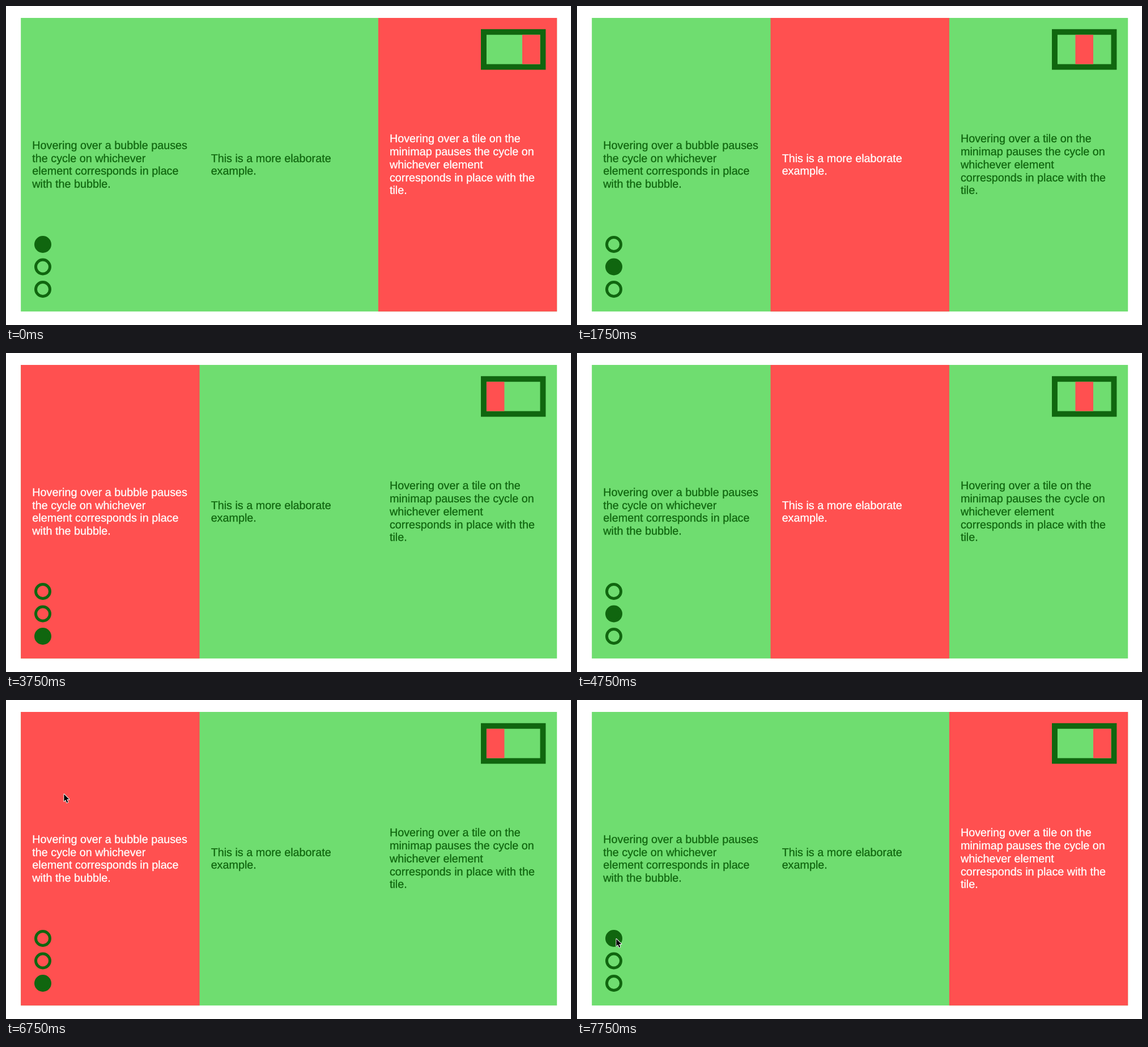
Animation of 997 by 562 pixels, one loop 8000 ms. Source, as an HTML page:

```html
<!DOCTYPE html>
<html lang="en">
<head>
<meta charset="utf-8">
<title>Cycling tiles</title>
<style>
  html, body { margin: 0; width: 100%; height: 100%; overflow: hidden; background: #fff; }
  svg { display: block; width: 997px; height: 562px; }
  text {
    font: 19.78px Helvetica, "Liberation Sans", Arial, sans-serif;
    text-rendering: geometricPrecision;
    stroke-width: .3;
  }
  circle { stroke: #10660f; stroke-width: 5; }
  #cursor { fill: #000; stroke: #fff; stroke-width: 1.8; stroke-linejoin: round; paint-order: stroke; }
</style>
</head>
<body>
<svg viewBox="0 0 997 562">
  <g id="tiles"></g>
  <g id="map"></g>
  <g id="bubbles"></g>
  <path id="cursor" d="M1.4 2V14.4L4.2 11.8L6.3 16.9L8.4 16L6.3 11H10.4Z"/>
</svg>
<script>
const GREEN = '#6fdd70', DARK = '#10660f', RED = '#ff5050', PALE = '#fff';
const LOOP = 8000, TICK = 1000, LINE = 22.75, PAD = 19.8, BORDER = 9.9;

const panel = { x: 26.2, y: 21, w: 946, h: 517.2 };
const map = { w: panel.w / 10, h: panel.h / 10 };
map.x = panel.x + panel.w - PAD - BORDER - map.w;
map.y = panel.y + PAD + BORDER;

const copy = [
  ['Hovering over a bubble pauses', 'the cycle on whichever', 'element corresponds in place', 'with the bubble.'],
  ['This is a more elaborate', 'example.'],
  ['Hovering over a tile on the', 'minimap pauses the cycle on', 'whichever element', 'corresponds in place with the', 'tile.']
];

// pointer stops: [time in ms, x, y]; it starts out above the stage
const stops = [
  [0, 100, -40], [2000, 100, -13], [2250, 100, -40], [5000, 3, 127], [5250, 60, 127],
  [5500, 68, 126], [6000, 67, 150], [6750, 101, 164], [7000, 201, 202], [7250, 108, 381], [7750, 68, 419]
];

const $ = id => document.getElementById(id);

function add(parent, tag, attrs) {
  const el = document.createElementNS('http://www.w3.org/2000/svg', tag);
  for (const key in attrs) el.setAttribute(key, attrs[key]);
  return parent.appendChild(el);
}

// a green base hides the seams between cells
function addCells(parent, { x, y, w, h }) {
  add(parent, 'rect', { x, y, width: w, height: h, fill: GREEN });
  return copy.map((_, i) =>
    add(parent, 'rect', { x: x + i * w / 3, y, width: w / 3, height: h }));
}

function addLabel(lines, i) {
  const x = panel.x + PAD + .3 + i * panel.w / 3;
  const top = panel.y + (panel.h - lines.length * LINE) / 2;
  const label = add($('tiles'), 'text', {});
  lines.forEach((line, n) => {
    add(label, 'tspan', { x, y: top + 17.7 + n * LINE }).textContent = line;
  });
  return label;
}

const tiles = addCells($('tiles'), panel);
const labels = copy.map(addLabel);
add($('map'), 'rect', {
  x: map.x - BORDER, y: map.y - BORDER,
  width: map.w + 2 * BORDER, height: map.h + 2 * BORDER, fill: DARK
});
const mapCells = addCells($('map'), map);

// bubbles run in the opposite order to the tiles
const bubbleY = i => 420 + (2 - i) * 39.5;
const bubbles = copy.map((_, i) =>
  add($('bubbles'), 'circle', { cx: 65, cy: bubbleY(i), r: 12.5 }));

// tile under the pointer or matching the bubble under it, -1 if none
function hovered(x, y) {
  const bubble = bubbles.findIndex((_, i) => Math.hypot(x - 65, y - bubbleY(i)) < 15);
  if (bubble >= 0) return bubble;
  const inside = x >= panel.x && x < panel.x + panel.w && y >= panel.y && y < panel.y + panel.h;
  return inside ? Math.floor((x - panel.x) / panel.w * 3) : -1;
}

function draw(t) {
  const [, x, y] = stops.findLast(s => s[0] <= t);
  const hover = hovered(x, y);
  const active = hover < 0 ? (Math.floor((t + 250) / TICK) + 2) % 3 : hover;
  for (let i = 0; i < 3; i++) {
    const on = i === active;
    tiles[i].style.fill = mapCells[i].style.fill = on ? RED : 'none';
    labels[i].style.fill = labels[i].style.stroke = on ? PALE : DARK;
    bubbles[i].style.fill = on ? DARK : 'none';
  }
  $('cursor').setAttribute('transform', `translate(${x} ${y})`);
}

const start = performance.now();
function frame() {
  draw((performance.now() - start) % LOOP);
  requestAnimationFrame(frame);
}
frame();
</script>
</body>
</html>
```
